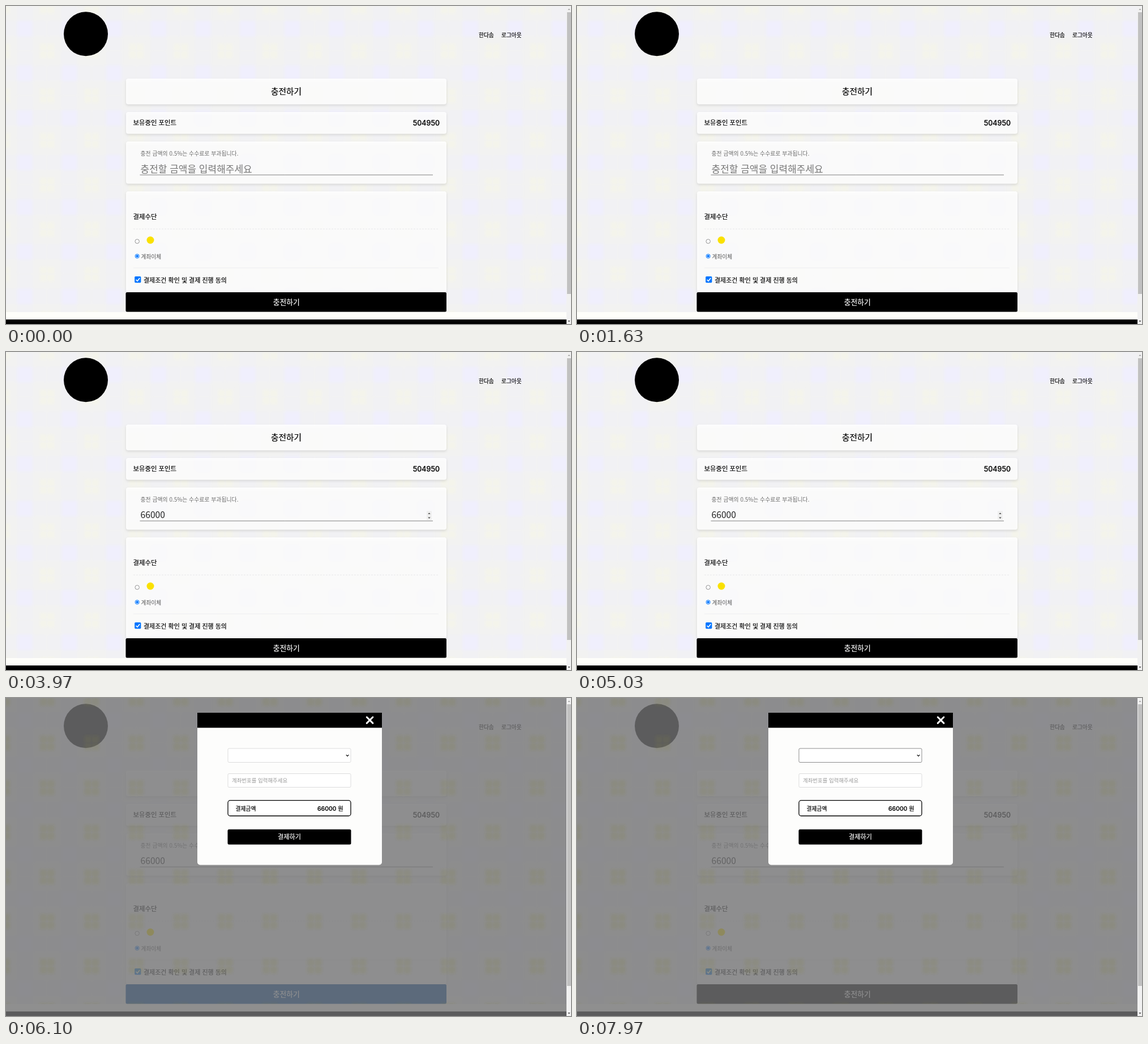
These frames come from a looping animation (998 by 561 pixels, 8000 ms). An HTML page:

```html
<!DOCTYPE html>
<html lang="ko">
<head>
<meta charset="utf-8">
<title>충전하기</title>
<style>
  html, body { margin: 0; width: 998px; height: 561px; overflow: hidden; background: #fefefa; }
  body { position: relative; font-family: "Noto Sans CJK KR", "Noto Sans CJK", sans-serif; }
  svg { position: absolute; left: 0; top: 0; }
  .mid { font-weight: 500; stroke: currentColor; stroke-width: .2; }
  .light { color: #fff; fill: #fff; }
  .num { font-family: Inter, "Noto Sans CJK KR", sans-serif; }
  .end { text-anchor: end; }
  .center { text-anchor: middle; }
  .card { fill: #fff; fill-opacity: .86; filter: drop-shadow(0 2px 2px rgba(0, 0, 0, .13)); }

  .typed {
    position: absolute; left: 237.5px; top: 277px; height: 20px; width: 0;
    overflow: hidden; white-space: nowrap; font-size: 15.7px; line-height: 20px; color: #222;
    border-right: 1px solid transparent; clip-path: inset(2px 0 0 0);
    animation: type 8s step-end infinite, blink 8s step-end infinite;
  }
  .hint { animation: hint 8s step-end infinite; }
  .spin { animation: spin 8s step-end infinite; }
  .charge { animation: hover 8s linear infinite; }
  .modal { animation: modal 8s step-end infinite; }
  .bank { animation: bank 8s linear infinite; }

  @keyframes type {
    0% { width: 0; }
    33.75% { width: 1ch; }
    37% { width: 2ch; }
    39% { width: 3ch; }
    40.75% { width: 4ch; }
    42.5%, 100% { width: 5ch; }
  }
  @keyframes blink {
    0%, 48.75%, 61.25%, 74.4%, 100% { border-color: transparent; }
    28.75%, 55%, 67.5% { border-color: #000; }
  }
  @keyframes hint { 0% { opacity: 1; } 33.75%, 100% { opacity: 0; } }
  @keyframes spin { 0% { opacity: 0; } 26.25% { opacity: 1; } 74.4%, 100% { opacity: 0; } }
  @keyframes hover {
    0%, 68.4% { fill: #000; }
    70.3%, 78.5% { fill: #004896; }
    80.4%, 100% { fill: #000; }
  }
  @keyframes modal { 0% { opacity: 0; } 74.4%, 100% { opacity: 1; } }
  @keyframes bank { 0%, 91% { stroke: #dcdcdc; } 92%, 100% { stroke: #8c8c8c; } }
</style>
</head>
<body>
<svg width="998" height="561" viewBox="0 0 998 561">
  <defs>
    <filter id="soft"><feGaussianBlur stdDeviation="2"/></filter>
    <pattern id="check" x="-6.3" y="0.5" width="78.7" height="78.7" patternUnits="userSpaceOnUse">
      <rect width="79" height="79" fill="#f2f2f1"/>
      <g filter="url(#soft)">
        <path d="M26 0h27v79h-27zM0 26h79v27h-79z" fill="#f1f1f4"/>
        <path d="M0 0h13v13h-13zM66 0h13v13h-13zM0 66h13v13h-13zM66 66h13v13h-13z" fill="#f4f4eb"/>
        <rect x="26" y="26" width="27" height="27" fill="#f0effd"/>
      </g>
    </pattern>
  </defs>
  <rect width="990" height="540" fill="url(#check)"/>
  <rect y="553" width="990" height="8"/>

  <circle cx="141" cy="49.3" r="39"/>
  <g class="mid" font-size="9.7">
    <text x="835" y="54.5">한다솜</text>
    <text x="875" y="54.5">로그아웃</text>
  </g>

  <rect class="card" x="212" y="128" width="566" height="45.5" rx="4"/>
  <rect class="card" x="212" y="187" width="566" height="38.5" rx="4"/>
  <rect class="card" x="212" y="239" width="566" height="74.5" rx="4"/>
  <rect class="card" x="212" y="327" width="566" height="178" rx="4"/>

  <text class="mid center" x="495" y="156" font-size="14.7">충전하기</text>
  <text class="mid" x="224.5" y="210.2" font-size="11.4">보유중인 포인트</text>
  <text class="mid num end" x="766" y="210.5" font-size="12.5">504950</text>

  <text x="237.5" y="263.6" font-size="9.9" fill="#6c6c6c">충전 금액의 0.5%는 수수료로 부과됩니다.</text>
  <text class="hint" x="237.5" y="293.8" font-size="17" font-weight="300" fill="#777">충전할 금액을 입력해주세요</text>
  <path d="M236.5 298h517.5" stroke="#808080"/>
  <g class="spin">
    <rect x="743" y="280.5" width="9" height="16" fill="#efefef"/>
    <path d="M745.3 286l2.2-2.5 2.2 2.5zM745.3 291.5l2.2 2.5 2.2-2.5z" fill="#505050"/>
  </g>

  <text class="mid" x="224.5" y="376.2" font-size="11.4">결제수단</text>
  <path d="M225 393.3h539" stroke="#e8e8ea" stroke-dasharray="3 2"/>
  <path d="M225 462h539" stroke="#eeeef0"/>
  <circle cx="231.7" cy="415.2" r="3.7" fill="#fff" stroke="#767676" stroke-width=".8"/>
  <circle cx="255" cy="413" r="6.5" fill="#fae100"/>
  <circle cx="231.7" cy="441.3" r="3.6" fill="#fff" stroke="#0075ff"/>
  <circle cx="231.7" cy="441.3" r="2.2" fill="#0075ff"/>
  <text x="238.5" y="445.5" font-size="9.7" fill="#555">계좌이체</text>
  <rect x="227.2" y="477" width="11.2" height="11.2" rx="1.6" fill="#0075ff"/>
  <path d="M229.6 482.8l2.4 2.4 4.2-5.2" fill="none" stroke="#fff" stroke-width="1.6"/>
  <text class="mid" x="243" y="488" font-size="11">결제조건 확인 및 결제 진행 동의</text>

  <rect class="charge" x="211.5" y="505" width="566.5" height="34.5" rx="2.5"/>
  <text class="mid light center" x="495.3" y="527" font-size="12.8">충전하기</text>

  <rect x="990" width="8" height="561" fill="#f1f1f1"/>
  <rect x="991" y="11" width="7" height="497" fill="#c1c1c1"/>
  <path d="M992.4 7l2.1-2.6 2.1 2.6z" fill="#a3a3a3"/>
  <path d="M992.4 555l2.1 2.6 2.1-2.6z" fill="#505050"/>
</svg>

<div class="typed">66000</div>

<svg class="modal" width="998" height="561" viewBox="0 0 998 561">
  <defs>
    <pattern id="shade" x="-6.3" y="0.5" width="78.7" height="78.7" patternUnits="userSpaceOnUse">
      <path d="M0 0h13v13h-13zM66 0h13v13h-13zM0 66h13v13h-13zM66 66h13v13h-13z" fill="#80803c" fill-opacity=".16" filter="url(#soft)"/>
    </pattern>
  </defs>
  <rect width="990" height="561" fill="#737375" fill-opacity=".8"/>
  <rect width="990" height="540" fill="url(#shade)"/>

  <path d="M338 26h326v263.5a5 5 0 0 1-5 5h-316a5 5 0 0 1-5-5z" fill="#fdfdfc"/>
  <rect x="338" y="26" width="326" height="26.5"/>
  <path d="M637.3 33.8l10.6 10.6m0-10.6l-10.6 10.6" stroke="#fff" stroke-width="3" stroke-linecap="round"/>

  <g fill="#fff" stroke="#dcdcdc">
    <rect class="bank" x="392" y="89" width="217" height="24.5" rx="2"/>
    <rect x="392" y="133.5" width="217" height="24" rx="2"/>
    <rect x="392" y="180.7" width="217" height="27.3" rx="4" stroke="#000" stroke-width="1.3"/>
  </g>
  <path d="M600.8 100.2l2.3 2.3 2.3-2.3" fill="none" stroke="#222" stroke-width="1.3"/>
  <text x="399" y="148.5" font-size="9.45" fill="#9a9a9a">계좌번호를 입력해주세요</text>
  <text class="mid" x="405.5" y="198.5" font-size="9.8">결제금액</text>
  <text class="mid num end" x="596" y="198.5" font-size="10.5">66000 원</text>
  <rect x="391.5" y="231.7" width="218" height="26.8" rx="2.5"/>
  <text class="mid light center" x="500.5" y="249.2" font-size="11.2">결제하기</text>
</svg>
</body>
</html>
```
